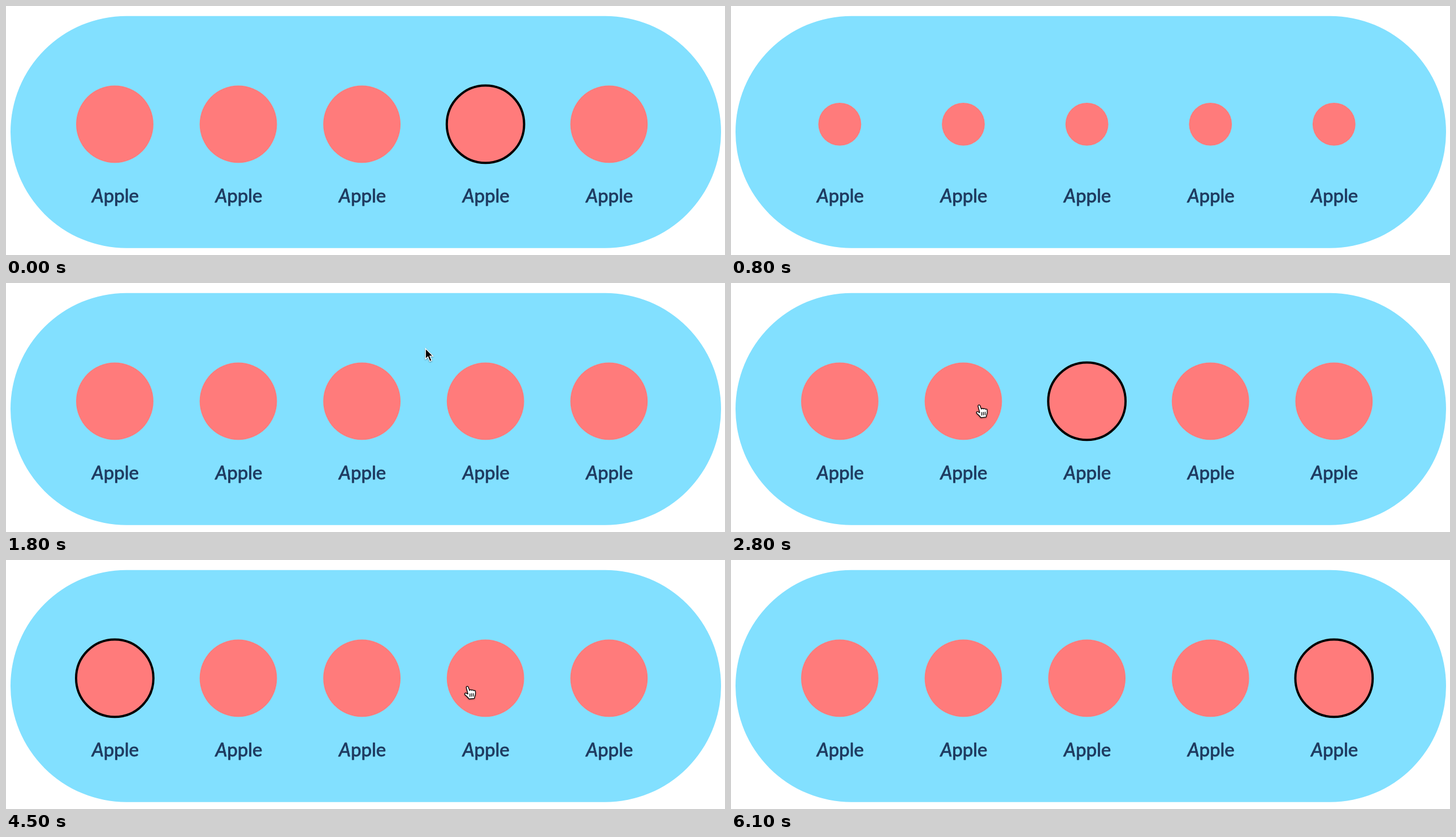
These frames come from a looping animation (1272x440 px, 6300 ms). An HTML page:

```html
<!DOCTYPE html>
<html lang="en">
<head>
<meta charset="utf-8">
<title>Fruit picker</title>
<style>
  html, body { margin: 0; width: 100%; height: 100%; overflow: hidden; background: #fff; }
  svg { display: block; width: 1272px; height: 440px; }
  text {
    font: 400 33px "Comic Sans MS", "Comic Neue", Lato, "Open Sans", sans-serif;
    fill: #1f3b60; stroke: #1f3b60; stroke-width: .9; stroke-linejoin: round;
    text-anchor: middle;
  }
  text::first-letter { font-style: italic; }
  .cursor { filter: drop-shadow(0 1.5px 1px rgba(0, 0, 0, .4)); }
</style>
</head>
<body>
<svg viewBox="0 0 1272 440">
  <rect x="8" y="17.7" width="1257" height="410" rx="205" fill="#82e0ff"/>
  <g id="items"></g>
  <g id="arrow" class="cursor">
    <path d="M0 0V18.5L4.3 14.6L7.6 22.6L11 21.2L7.7 13.3H13.2Z" fill="#000" stroke="#fff" stroke-width="1.3"/>
  </g>
  <g id="hand" class="cursor" stroke="#000" stroke-width="1.3" stroke-linecap="round" stroke-linejoin="round">
    <path fill="#fff" d="M-1.4 2.6C-2 .2 1 -.8 2 1.5L4.3 7.6Q6.5 5 8 7.3Q10 5.6 11.5 7.8
      Q14.4 6.8 14.6 9.3Q15.2 14.5 13.8 17.2L12.7 21.6L3.4 22.5Q1.5 19.5 -4 14.9Q-5 11.6 -2.1 12.2L1.5 13.9Z"/>
    <path fill="none" d="M5 13.3v5M8 13v5M11 12.8v5"/>
  </g>
</svg>
<script>
const LOOP = 6300, STEP = 100;
const COUNT = 5, RADIUS = 68.4, CENTER_Y = 208.9;
const RELOAD = 567, GROW = 700;
const ENTER = 1600, FIRST_PICK = 2450, PICK_EVERY = 800, EXIT = 6050;
const START = { x: 820, y: 47 }, END = { x: 652, y: -4 };
const pickOrder = [2, 1, 0, 3, 4];

const byId = id => document.getElementById(id);
const clamp = v => Math.max(0, Math.min(1, v));
const smooth = p => p * p * (3 - 2 * p);
const mix = (a, b, p) => a + (b - a) * p;
const centerX = i => 192.4 + i * 218.6;

function add(tag, attrs) {
  const node = document.createElementNS("http://www.w3.org/2000/svg", tag);
  for (const key in attrs) node.setAttribute(key, attrs[key]);
  return byId("items").appendChild(node);
}

const circles = Array.from({ length: COUNT }, (_, i) => {
  const cx = centerX(i);
  const label = add("text", { x: cx + 1, y: 346.5 });
  label.innerHTML = '<tspan font-style="italic">A</tspan>pple';
  return add("circle", { cx, cy: CENTER_Y, fill: "#ff7b7b", "stroke-width": 4 });
});

// Index into pickOrder of the latest pick, -1 before the first
const latestPick = t => Math.min(COUNT - 1, Math.max(-1, Math.floor((t - FIRST_PICK) / PICK_EVERY)));

// The pointer sways gently while it goes from one circle to the next
function pointerAt(t) {
  if (t < ENTER || t > EXIT) return null;
  const swayY = 214 - 9 * Math.cos(Math.PI * (t - 3400) / 1100);
  const stop = k => k < 0 ? START : k < COUNT ? { x: centerX(pickOrder[k]), y: swayY } : END;
  const pick = latestPick(t);
  const from = stop(pick), to = stop(pick + 1);
  const leave = pick < 0 ? ENTER : FIRST_PICK + pick * PICK_EVERY;
  const travel = 415 + 0.16 * Math.hypot(to.x - from.x, to.y - from.y);
  const p = smooth(clamp((t - leave) / Math.min(travel, EXIT - leave)));
  return [mix(from.x, to.x, p), mix(from.y, to.y, p)];
}

function showCursor(id, visible, point) {
  const node = byId(id);
  node.style.display = visible ? "" : "none";
  if (visible) node.setAttribute("transform", `translate(${point})`);
}

function draw(t) {
  const rest = 1 - clamp((t - RELOAD) / GROW);
  const scale = t < RELOAD ? 1 : 1 - rest * rest;
  const selected = t < RELOAD ? 3 : pickOrder[latestPick(t)];
  circles.forEach((circle, i) => {
    circle.setAttribute("r", RADIUS * scale);
    circle.setAttribute("stroke", i === selected ? "#000" : "none");
  });

  const point = pointerAt(t);
  const hover = !!point && circles.some((_, i) => Math.hypot(point[0] - centerX(i), point[1] - CENTER_Y) < RADIUS);
  showCursor("hand", hover, point);
  showCursor("arrow", !!point && !hover, point);
}

const start = performance.now();
function tick() {
  const t = (performance.now() - start) % LOOP;
  draw(Math.floor(t / STEP) * STEP);
  requestAnimationFrame(tick);
}
tick();
</script>
</body>
</html>
```
